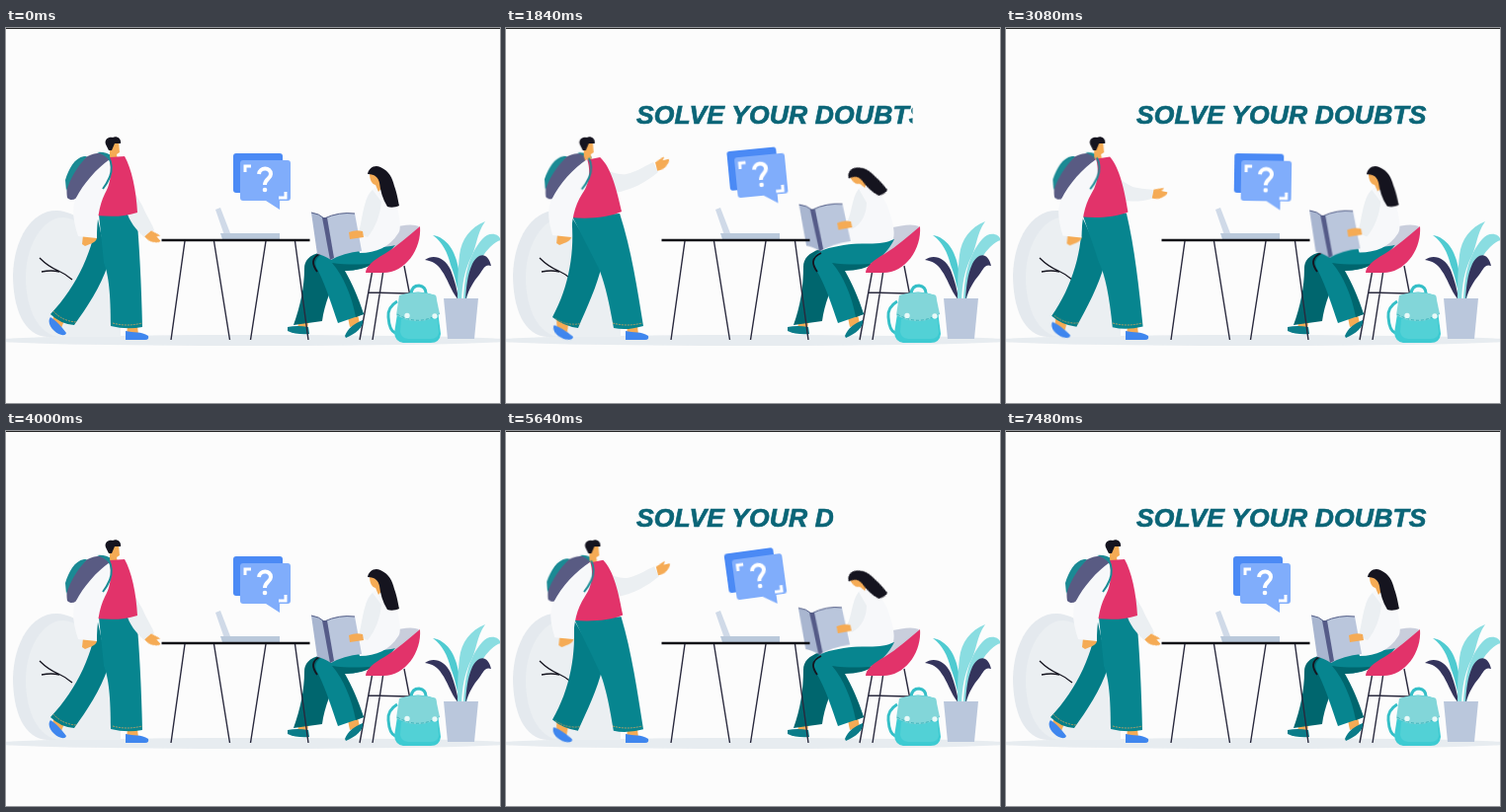
An HTML page that plays this animation: 500x380 px, repeating every 8 s.

```html
<!DOCTYPE html>
<html lang="en">
<head>
<meta charset="utf-8">
<title>Solve your doubts</title>
<style>
html, body { margin: 0; width: 100%; height: 100%; overflow: hidden; background: #fcfcfc; }
svg { display: block; width: 500px; height: 380px; }

.teal { fill: #07858f; }
.deep { fill: #047d87; }
.dark { fill: #00666e; }
.pink { fill: #e2336a; }
.skin { fill: #f5ab55; }
.ink { fill: #15141f; }
.navy { fill: #34345c; }
.cloth { fill: #f7f8fa; }
.shade { fill: #ebeff2; }
.shoe { fill: #3f86ee; }
.leaf { fill: #8adde1; }
.line { fill: none; stroke: #29293d; stroke-width: 1.4; }
.hem { fill: none; stroke: #d8a45d; stroke-width: .8; stroke-dasharray: 2 1; }
.title { font: italic bold 26.5px "Liberation Sans", Arial, sans-serif; letter-spacing: .15px; fill: #0b6577; stroke: #0b6577; stroke-width: .7; }

.move { animation: 4s ease-in-out infinite; }
.wipe { animation-name: wipe; animation-timing-function: linear; }
.bubble { animation-name: bubble; transform-origin: 260px 155px; }
.head { animation-name: head; }
.pack { animation-name: pack; transform-origin: 84px 150px; }
.side { animation-name: side; }
.palm { animation-name: palm; }
.arm { animation-name: arm; }
.hand { animation-name: hand; }
.vest { animation-name: vest; }
.front { animation-name: front; }
.back { animation-name: back; }
.foot { animation-name: foot; transform-origin: 53px 300px; }
.bow { animation-name: bow; transform-origin: 370px 150px; }
.torso { animation-name: torso; }
.sleeve { animation-name: sleeve; }
.thigh { animation-name: thigh; }
.shin { animation-name: shin; }
.book { animation-name: book; transform-origin: 333px 212px; }

@keyframes wipe {
  0%, 32% { clip-path: inset(-5px 100% -5px -2px); }
  47%, 100% { clip-path: inset(-5px -5px -5px -2px); }
}
@keyframes bubble {
  0%, 8%, 87%, 100% { transform: none; }
  26% { transform: translate(1px, .5px) rotate(.6deg); }
  32% { transform: translate(-6.5px, -6.5px) rotate(-8.5deg); }
  36% { transform: translate(-7px, -7.5px) rotate(-9deg); }
  61% { transform: translate(1.5px, .5px) rotate(1.5deg); }
  63% { transform: translate(2.5px, 1px) rotate(2.5deg); }
}
@keyframes head {
  0%, 26%, 87%, 100% { transform: none; animation-timing-function: ease-in; }
  32% { transform: translate(-1px, .5px); animation-timing-function: ease-in-out; }
  47%, 69% { transform: translate(-26.5px, 0); animation-timing-function: ease-in-out; }
}
@keyframes pack {
  0%, 24%, 87%, 100% { transform: none; animation-timing-function: ease-in; }
  32% { transform: translate(-5px, -3px) rotate(5deg); animation-timing-function: ease-out; }
  47%, 69% { transform: translate(-21px, 0) rotate(2deg); animation-timing-function: ease-in-out; }
}
@keyframes side {
  0%, 24%, 87%, 100% { d: path("M105 133C107 146 106 158 100 168C94 180 92 196 92 213L73 211C68 196 66 182 71 172C78 158 92 142 105 133Z"); animation-timing-function: ease-in; }
  32% { d: path("M103 131C105 143 103 156 95 166C86 178 81 192 81 206L62 205C57 192 55 181 60 171C67 156 88 139 103 131Z"); animation-timing-function: ease-out; }
  47%, 69% { d: path("M82 133C86 146 84 158 77 168C69 180 66 196 66 212L47 210C43 196 41 184 46 174C54 158 68 142 82 133Z"); animation-timing-function: ease-in-out; }
}
@keyframes palm {
  0%, 24%, 87%, 100% { transform: none; animation-timing-function: ease-in; }
  32% { transform: translate(-11px, -7px); animation-timing-function: ease-out; }
  47%, 69% { transform: translate(-26px, -1px); animation-timing-function: ease-in-out; }
}
@keyframes arm {
  0%, 14%, 87%, 100% { d: path("M120 150C126 160 132 170 138 180C142 190 148 198 150 205L140 212C132 205 124 195 122 185Z"); animation-timing-function: ease-in; }
  26% { d: path("M120 150C128 160 136 166 146 168C150 170 156 173 160 178L157 188C146 190 134 190 124 188Z"); animation-timing-function: linear; }
  32% { d: path("M112 142C122 152 130 156 138 154C146 151 152 149 157 147L162 157C152 165 140 173 126 178Z"); animation-timing-function: ease-out; }
  46%, 69% { d: path("M92 138C104 146 112 149 122 148C134 145 142 139 149 136L154 146C142 156 128 164 110 167Z"); animation-timing-function: ease-in-out; }
}
@keyframes hand {
  0%, 14%, 87%, 100% { transform: translate(144px, 208px) rotate(48deg); animation-timing-function: ease-in; }
  26% { transform: translate(158px, 182px) rotate(42deg); animation-timing-function: linear; }
  32% { transform: translate(159px, 152px) rotate(-14deg); animation-timing-function: ease-out; }
  46%, 69% { transform: translate(152px, 140px) rotate(-14deg); animation-timing-function: ease-in-out; }
}
@keyframes vest {
  0%, 24%, 87%, 100% { d: path("M105 131L120 130C127 142 132 165 133 187C118 192 104 191 91 190L91 176C98 160 102 150 105 131Z"); animation-timing-function: ease-in; }
  32% { d: path("M102 132L116 130C123 143 125 165 125 190C110 193 94 192 79 191L80 178C88 162 97 150 102 132Z"); animation-timing-function: ease-out; }
  47%, 69% { d: path("M80 134L95 131C107 142 112 165 117 186C104 192 84 194 65 192L64 180C70 162 76 150 80 134Z"); animation-timing-function: ease-in-out; }
}
@keyframes front {
  0%, 24%, 87%, 100% { d: path("M94 189L132 187C135 220 137 260 138 303Q122 306 106 302C106 270 104 250 99 238Z"); animation-timing-function: ease-in; }
  32% { d: path("M81 190L125 189C129 222 134 262 139 303Q122 306 108 302C106 270 102 250 97 238Z"); animation-timing-function: ease-out; }
  47%, 69% { d: path("M67 191L115 188C127 225 133 265 139 302Q122 307 109 304C104 275 98 250 91 238Z"); animation-timing-function: ease-in-out; }
}
@keyframes back {
  0%, 24%, 87%, 100% { d: path("M92 189C90 222 72 262 45 290Q55 300 69 301C82 283 96 262 103 240Z"); animation-timing-function: ease-in; }
  32% { d: path("M80 190C80 222 70 262 47 290Q57 300 72 302C84 283 96 262 101 240Z"); animation-timing-function: ease-out; }
  47%, 69% { d: path("M66 191C70 225 64 262 47 293Q58 302 73 304C82 283 92 262 97 240Z"); animation-timing-function: ease-in-out; }
}
@keyframes foot {
  0%, 24%, 87%, 100% { transform: none; }
  32% { transform: translate(3px, 3px) rotate(-4deg); }
  47%, 69% { transform: translate(5px, 6px) rotate(-14deg); }
}
@keyframes bow {
  0%, 8%, 86%, 100% { transform: none; }
  25%, 56% { transform: translate(-19px, 2.5px) rotate(-29deg) scale(.9); animation-timing-function: cubic-bezier(.2, .3, .3, 1); }
}
@keyframes torso {
  0%, 8%, 86%, 100% { d: path("M378 160C385 158 392 170 396 182C399 195 400 204 397 208C388 222 375 228 358 228C356 222 356 216 358 212C361 200 362 180 366 170C369 164 374 161 378 160Z"); }
  25%, 56% { d: path("M362 159C373 157 380 168 386 180C391 195 394 204 392 214C384 219 370 219 350 218C348 212 346 206 347 203C350 195 350 180 353 170C355 164 359 160 362 159Z"); animation-timing-function: cubic-bezier(.2, .3, .3, 1); }
}
@keyframes sleeve {
  0%, 8%, 86%, 100% { d: path("M371 164C362 172 361 192 357 208L366 212C374 203 379 188 380 176Z"); }
  25%, 56% { d: path("M357 163C350 172 350 188 345 197L350 204C360 199 365 188 365 177Z"); animation-timing-function: cubic-bezier(.2, .3, .3, 1); }
}
@keyframes thigh {
  0%, 8%, 86%, 100% { d: path("M394 220C380 224 340 222 320 229C312 234 312 240 316 246C324 262 330 282 336 299L362 290C356 275 350 258 342 246C360 246 380 238 394 220Z"); }
  25%, 56% { d: path("M393 214C376 218 340 217 318 226C309 231 310 237 314 245C324 262 330 282 336 299L362 290C356 273 349 256 340 244C360 246 382 237 393 214Z"); animation-timing-function: cubic-bezier(.2, .3, .3, 1); }
}
@keyframes shin {
  0%, 8%, 86%, 100% { d: path("M320 227C306 230 302 236 302 244C302 262 298 282 291 301L320 297C322 280 330 262 336 248Z"); }
  25%, 56% { d: path("M318 224C306 228 301 234 301 242C301 262 298 282 291 301L320 297C322 280 330 262 336 246Z"); animation-timing-function: cubic-bezier(.2, .3, .3, 1); }
}
@keyframes book {
  0%, 8%, 87%, 100% { transform: none; animation-timing-function: ease-in-out; }
  26% { transform: translate(-9.5px, -4.5px) rotate(-5deg); }
  32% { transform: translate(-13px, -8px) rotate(-2deg); }
  61% { transform: translate(-10px, -10px) rotate(-2deg); animation-timing-function: linear; }
  63% { transform: translate(-7px, -10px) rotate(-2deg); animation-timing-function: ease-out; }
}
</style>
</head>
<body>
<svg viewBox="0 0 500 380">
  <rect width="500" height="1" fill="#262626"/>
  <ellipse cx="250" cy="316.500" rx="264" ry="5.500" fill="#e7ecf0"/>

  <!-- bush -->
  <path fill="#e4e9ee" d="M7 250C8 214 26 184 52 185C88 187 116 240 116 313H42C18 312 7 284 7 250Z"/>
  <path fill="#ebeff2" d="M20 252C20 222 36 192 58 192C88 194 116 244 116 313H56C32 312 20 284 20 252Z"/>
  <path fill="none" stroke="#15141f" stroke-width="1.3" d="M34 233Q43 242 53 246Q60 249 67 255M36 247Q46 245 54 247"/>

  <!-- student standing -->
  <g class="move foot">
    <path class="skin" d="M49 288L60 294L56 304L47 297Z"/>
    <path class="shoe" d="M45 293C50 296 56 302 61 309C60 313 53 311 49 307C44 303 42 297 45 293Z"/>
  </g>
  <path class="deep move back"/>
  <path class="skin" d="M123 302H133L134 311H122Z"/>
  <path class="shoe" d="M121 307C129 309 137 307 144 312Q145 316 141 316H121Z"/>
  <path class="teal move front"/>
  <path class="hem" d="M108 299Q122 303 138 299"/>
  <path class="hem move foot" d="M48 287Q57 297 71 298"/>
  <path class="shade move arm"/>
  <path class="skin move hand" d="M0 -4C5 -5 8 -8 10 -7L8 -4L14 -4C15 -2 12 1 9 3C6 5 3 5 0 5Z"/>
  <g class="move pack">
    <path fill="#595b83" d="M106 129C94 124 81 128 73 138C64 148 60 160 62 172C66 176 71 174 75 168L102 142Z"/>
    <path fill="#1b8a94" d="M79 130C69 132 64 142 60 154L61 165C66 151 71 142 82 130ZM92 126Q101 125 107 130L105 134Q99 128 92 126Z"/>
  </g>
  <g class="move head">
    <path class="skin" d="M105 118L114 115L115 126L112 128L113 134L107 136L105 130Z"/>
    <path class="ink" d="M101 118C99 113 104 110 108 111C112 109 117 112 116 117L110 117L107 124H104Z"/>
  </g>
  <path class="pink move vest"/>
  <path class="skin move palm" d="M78 210L92 212C92 217 87 218 80 221L77 219Z"/>
  <path class="cloth move side"/>
  <path class="move pack" fill="none" stroke="#1b8a94" stroke-width="2" d="M104 131Q109 140 105 151Q102 158 98 163"/>

  <!-- laptop -->
  <path fill="#d0daE8" d="M212 184L217 182L227 208L222 213Z"/>
  <path fill="#bac9db" d="M217 208H277V214H219Z"/>

  <g class="move bubble">
    <rect x="230" y="127" width="50" height="40" rx="3" fill="#4b8af5"/>
    <path fill="#80adfb" d="M240 134H285Q288 134 288 137V172Q288 175 285 175H277V184L263 175H240Q237 175 237 172V137Q237 134 240 134Z"/>
    <path fill="none" stroke="#fff" stroke-width="3" d="M242 146V140H248M276 172H283V166"/>
    <path fill="none" stroke="#fff" stroke-width="4" d="M256 148C256.500 141 268 140.500 268 148C268 153 262 152.500 262 159"/>
    <circle cx="262" cy="164" r="2.300" fill="#fff"/>
  </g>

  <!-- chair -->
  <path class="line" d="M371 245L358 316M382 245L371 316M403 241L409 272M367 268L408 269"/>
  <path fill="#c9cedc" d="M388 203Q410 197 418 201L410 222L372 242Z"/>

  <!-- student reading -->
  <path class="skin" d="M296 299L306 297L305 306L295 306Z"/>
  <path fill="#0b7c89" d="M285 303Q295 301 306 303L307 310Q294 311 285 307Z"/>
  <path class="skin" d="M346 293L356 290L358 300L348 303Z"/>
  <path fill="#0b7c89" d="M343 312C346 304 352 300 361 296C363 302 354 310 344 314Z"/>
  <path class="dark move shin"/>
  <path class="teal move thigh"/>
  <path class="dark" d="M330 238C342 252 350 272 354 293L362 290C357 274 350 258 343 246C354 246 366 243 374 238C362 240 344 240 330 238Z"/>
  <path fill="none" stroke="#15141f" stroke-width="1.800" d="M319 228C308 233 310 240 315 247"/>
  <path class="cloth move torso"/>
  <path class="pink" d="M419 201C421 224 404 248 382 248H364C364 242 372 235 383 229C396 221 407 211 419 201Z"/>
  <g class="move bow">
    <path class="skin" d="M368 147C368 154 370 158 374 159L377 166L382 160L378 147Z"/>
    <path class="ink" d="M366 148C367 142 373 138 379 141C388 145 391 152 393 160C396 168 397 176 398 180C394 182 389 182 386 181C381 173 379 165 378 157C377 152 374 148 366 148Z"/>
  </g>
  <path class="shade move sleeve"/>
  <g class="move book">
    <path fill="#a9b6d0" d="M309 187Q317 188 322 193L329 235Q321 230 315 229Z"/>
    <path fill="#bac6dc" d="M322 193Q337 186 353 188L360 226Q341 228 329 235Z"/>
    <path fill="#555b88" d="M320 192L325 192L332 233L328 235Z"/>
    <path fill="none" stroke="#555f87" d="M309 187Q317 188 322 193Q337 186 353 188"/>
    <path class="skin" d="M347 207Q354 204 361 206L362 212L348 214Z"/>
  </g>

  <!-- table -->
  <path class="line" d="M181 216L167 316M210.500 216L226.500 316M263 216L247.500 316M292.500 216L306 316"/>
  <path stroke="#101116" stroke-width="2.500" d="M157.500 215H307.500"/>

  <!-- plant -->
  <path class="navy" d="M424 235C432 229 444 232 450 245C454 255 457 266 458 276C449 264 447 254 441 246C437 239 431 236 424 235Z"/>
  <path fill="#4fcbd1" d="M432 210C446 212 455 226 458 244L460 276C456 262 455 252 450 240C447 228 442 217 432 210Z"/>
  <path class="leaf" d="M485 196C470 202 461 214 459 230C457 248 457 262 457 276H461C462 258 464 248 469 236C476 225 476 208 485 196Z"/>
  <path class="leaf" d="M501 215C498 207 488 207 482 214C468 230 464 252 463 276H466C470 254 478 234 490 222Q496 216 501 215Z"/>
  <path class="navy" d="M491 241C488 227 478 227 472 239C467 250 466 262 465 276C469 264 473 257 479 250C484 243 485 239 491 241Z"/>
  <path fill="#bac7dc" d="M443 274H478L474 315H447Z"/>

  <!-- backpack -->
  <path fill="none" stroke="#35bfc7" stroke-width="3" d="M396 277Q386 283 387 293Q388 307 394 309M410 269Q411 261 418 261Q425 262 425 269"/>
  <path fill="#3ecbd2" d="M399 271Q417 264 435 271L440 310Q439 319 430 319H402Q394 318 393 309Z"/>
  <path fill="#52d1d6" d="M400 295H437L438 309Q437 315 429 315H407Q400 314 399 308Z"/>
  <path fill="#82d6d9" d="M398 271Q417 265 435 271L439 290Q418 304 395 291Z"/>
  <path fill="none" stroke="#2aaab3" stroke-width=".8" stroke-dasharray="3 2" d="M396 290Q418 303 439 289"/>
  <circle cx="406" cy="291.500" r="2.700" fill="#e9f9f8"/>
  <circle cx="434" cy="292" r="2.700" fill="#e9f9f8"/>

  <text class="title move wipe" x="132" y="96.500">SOLVE YOUR DOUBTS</text>
</svg>
<script>
const moves = document.getAnimations();
moves.forEach(m => m.pause());

// The second pass runs 40 ms ahead of the first.
function draw() {
  const t = Math.floor(performance.now() % 8000 / 40) * 40;
  const local = t < 4000 ? t : Math.min(t - 3960, 3999);
  moves.forEach(m => { m.currentTime = local; });
  requestAnimationFrame(draw);
}
draw();
</script>
</body>
</html>
```
